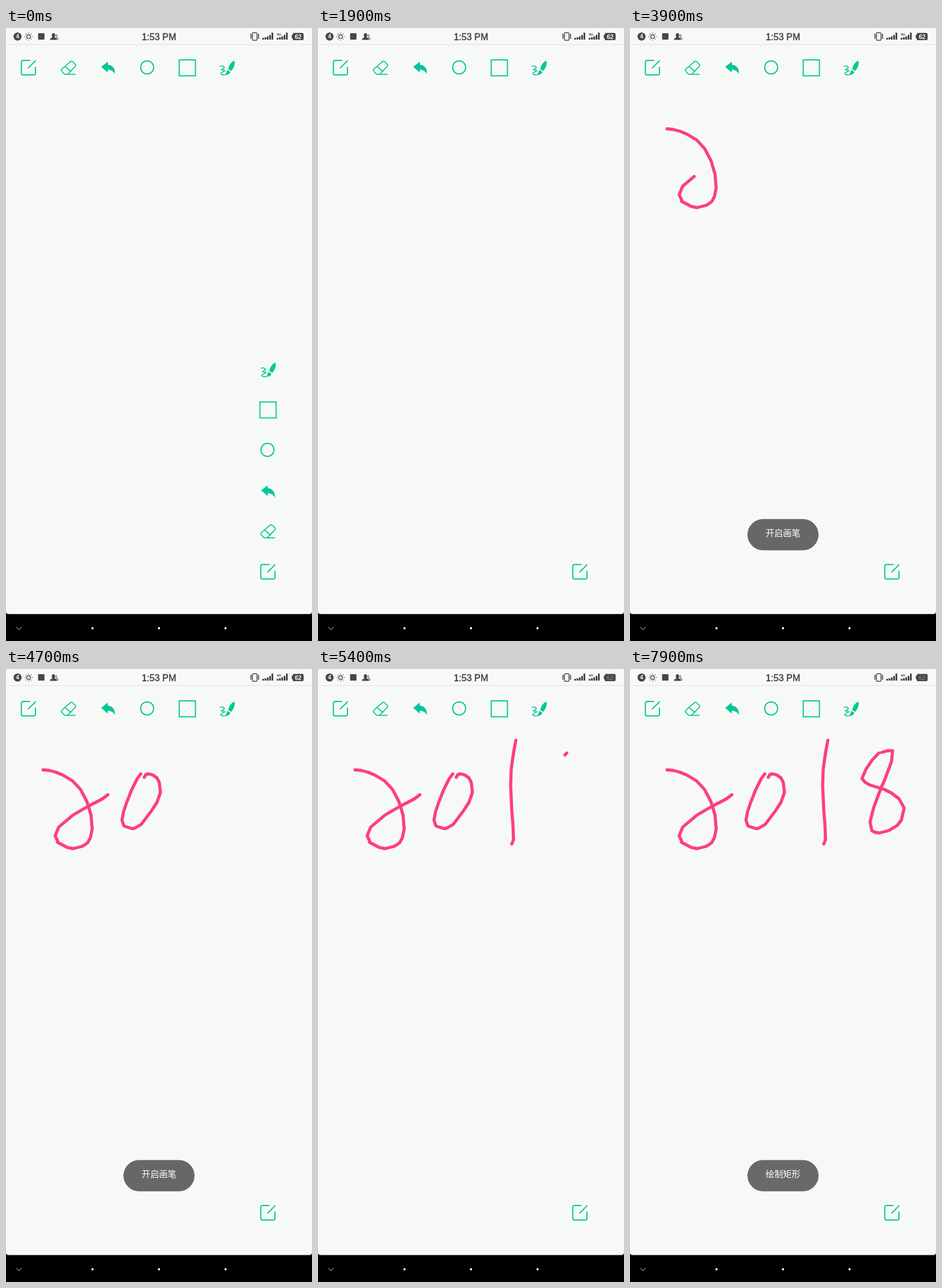
An HTML page for the animation above (8 s loop, 529 px wide and 1058 px high).

```html
<!DOCTYPE html>
<html lang="zh">
<head>
<meta charset="utf-8">
<title>Drawing board</title>
<style>
html, body { margin: 0; width: 100%; height: 100%; overflow: hidden; background: #000; }
svg { display: block; width: 100%; height: 100%; }
:root { --green: #07c798; --dark: #444645; }

.line { fill: none; stroke: var(--green); stroke-width: 2; stroke-linecap: round; stroke-linejoin: round; }
.solid { fill: var(--green); }
.dark { fill: var(--dark); }
.dark-line { fill: none; stroke: var(--dark); stroke-width: 1.4; }
.label { font-family: "Liberation Sans", Arial, sans-serif; text-anchor: middle; }
.clock { font-size: 16px; fill: #404241; stroke: #404241; stroke-width: .45; }
.small { font-weight: bold; fill: #f7f9f7; }

.item, .pen path, .toast, .level { animation: 8s linear infinite; }
.item { animation-name: collapse; }
.level { animation-name: blink; animation-timing-function: step-end; }

.pen { fill: none; stroke: #fd3f7f; stroke-width: 5.4; stroke-linecap: round; stroke-linejoin: round; }
.pen path { stroke-dasharray: 1 2; }
.two { animation-name: two !important; }
.zero { animation-name: zero !important; }
.one { animation-name: one !important; }
.eight { animation-name: eight !important; }

.toast { font: 15px "Noto Sans CJK SC", "Noto Sans CJK", sans-serif; text-anchor: middle; fill: #fff; }
.toast rect { fill: #666866; }
.start { animation-name: start; }
.shape { animation-name: shape; }

@keyframes collapse {
  0%, 10% { transform: none; opacity: 1; animation-timing-function: ease-in-out; }
  22.5%, 23.2% { transform: translateY(var(--drop)); opacity: 1; }
  23.21%, 100% { transform: translateY(var(--drop)); opacity: 0; }
}
@keyframes blink {
  0%, 16.25%, 47.5%, 78.75% { fill: #f7f9f7; }
  3.75%, 35%, 66.25%, 97.5%, 100% { fill: #727473; }
}
@keyframes two {
  0%, 41.9% { stroke-dashoffset: 1; opacity: 0; }
  41.91% { stroke-dashoffset: 1; opacity: 1; }
  50.6%, 100% { stroke-dashoffset: 0; opacity: 1; }
}
@keyframes zero {
  0%, 52.5% { stroke-dashoffset: 1; opacity: 0; }
  52.51% { stroke-dashoffset: 1; opacity: 1; }
  58%, 100% { stroke-dashoffset: 0; opacity: 1; }
}
@keyframes one {
  0%, 60.6% { stroke-dashoffset: 1; opacity: 0; }
  60.61% { stroke-dashoffset: 1; opacity: 1; }
  65%, 100% { stroke-dashoffset: 0; opacity: 1; }
}
@keyframes eight {
  0%, 67.37% { stroke-dashoffset: 1; opacity: 0; }
  67.38% { stroke-dashoffset: 1; opacity: 1; }
  78.75%, 100% { stroke-dashoffset: 0; opacity: 1; }
}
@keyframes start {
  0%, 31.8% { opacity: 0; animation-timing-function: ease-out; }
  36.8%, 59.2% { opacity: 1; }
  63.5%, 100% { opacity: 0; }
}
@keyframes shape {
  0%, 94.3% { opacity: 0; animation-timing-function: ease-out; }
  99.3%, 100% { opacity: 1; }
}
</style>
</head>
<body>
<svg viewBox="0 0 529 1058" preserveAspectRatio="none">
  <defs>
    <g id="edit" class="line">
      <path d="M41 56H29.5Q26.5 56 26.5 59V78Q26.5 81 29.5 81H48Q51 81 51 78V67.5M51 56.5L38.5 69"/>
    </g>
    <g id="eraser" class="line" style="stroke-width:1.7">
      <path d="M111.5 58Q113.3 56.6 115 58L119.8 62.6Q121.3 64.4 119.8 66.2L106.5 79.8H101.5L96.3 74.8Q94.8 73 96.3 71.2ZM102.5 66.8L112 75M101.5 79.8H119.5"/>
    </g>
    <path id="undo" class="solid" d="M164.5 67L176 58V63.2C184.5 64 189 70 188.3 79.5C185 74 181.5 72 176 72V77Z"/>
    <circle id="ring" class="line" cx="244" cy="68" r="11.3"/>
    <rect id="box" class="line" style="stroke-linejoin:miter" x="299.5" y="55" width="28" height="27.5"/>
    <g id="brush">
      <path class="solid" d="M395 56.5C389 58 386 64 384 71L389.5 74C394 69 396.3 63 395 56.5ZM383 72.5L388 75.5C386.5 79.5 383.5 81 379 81C381 79 381 75 383 72.5Z"/>
      <path class="line" style="stroke-width:1.7" d="M370 66Q375 64.5 377.5 67.5Q377 70 372 72.5Q376 72 378.5 74Q372 76.5 371 79Q374 82 380 80.3"/>
    </g>
    <g id="bars" class="dark">
      <path d="M0 17h3v3h-3zM4 16h3v4h-3zM8 14.5h3v5.5h-3zM12 12h3v8h-3zM16 8h3v12h-3z"/>
    </g>
    <rect id="pill" x="203" y="847.5" width="123" height="54" rx="27"/>
  </defs>

  <rect width="529" height="1058"/>
  <path fill="#f7f9f7" d="M0 0H529V1007Q529 1011.5 524 1011.5H5Q0 1011.5 0 1007Z"/>
  <path fill="#dfe1df" d="M0 28h529v1H0z"/>

  <!-- status bar -->
  <circle class="dark" cx="20" cy="14.7" r="7"/>
  <text class="label small" x="20" y="18.2" font-size="10">4</text>
  <circle class="dark-line" cx="39" cy="14.7" r="3.2"/>
  <circle class="dark-line" cx="39" cy="14.7" r="6.3" pathLength="16" stroke-dasharray=".55 1.45" stroke-dashoffset=".27" stroke-width="1.8"/>
  <rect class="dark" x="55.5" y="9" width="11" height="11"/>
  <path fill="#a5a7a6" d="M84 20Q87 16 85 13Q85 10.5 87 10.5Q89.5 10.5 89 14Q88 16 91 17.5V20Z"/>
  <path class="dark" d="M76 20.5Q76 17.5 79.5 16.8Q80.5 16 79.3 14Q78.5 9 82 9Q85.5 9 84.7 14Q83.5 16 84.5 16.8Q88 17.5 88 20.5Z"/>
  <text class="label clock" x="264.5" y="20.5">1:53 PM</text>
  <rect class="dark-line" x="426.2" y="8.2" width="7.6" height="13" rx="1"/>
  <path class="dark-line" stroke-width="1" d="M422.8 10l1.4 1.7-1.4 1.7 1.4 1.7-1.4 1.7 1.4 1.7M437.2 10l-1.4 1.7 1.4 1.7-1.4 1.7 1.4 1.7-1.4 1.7"/>
  <use href="#bars" x="443"/>
  <use href="#bars" x="468"/>
  <text class="label dark" x="472" y="13" font-size="6" font-weight="bold">4G</text>
  <path class="dark" d="M498 8.5H512Q514.5 8.5 514.5 11V18.5Q514.5 21 512 21H498Q495.5 21 495.5 18.5V17.5H494V12H495.5V11Q495.5 8.5 498 8.5Z"/>
  <text class="label small level" x="505" y="18.6" font-size="10.5">62</text>

  <!-- toolbar -->
  <use href="#edit"/>
  <use href="#eraser"/>
  <use href="#undo"/>
  <use href="#ring"/>
  <use href="#box"/>
  <use href="#brush"/>

  <g class="pen">
    <path class="two" pathLength="1" d="M64 174L74 175 86 178 98 183 115 193 129 208 140 229 147 252 149 276 146 291 141 300 132 306 116 310 106 308 89 299 89 296 85 288 91 273 116 252 140 238 167 224 176 217"/>
    <path class="zero" pathLength="1" d="M233 181L227 189 217 209 208 232 203 247 200.500 261 204 271 218 275.500 222 275 234 268 252 244 261 230 267 213 265 196 261 188 254 183 247 181 242 182 239 187"/>
    <path class="one" pathLength="1" d="M342 123L338 145 334 173 333 200 335 245 337 268 338 295 335 302"/>
    <path class="eight" pathLength="1" d="M430 145L418 158 408 173 401 189 406 195 414 200 440 208 452 214 465 224 474 240 469 261 462 270 447 279 431 283 424 282 418 279 415 264 421 240 434 205 440 192 452 160 454 141 445 141 435 144"/>
  </g>

  <!-- floating menu -->
  <use class="item" style="--drop:348px" href="#brush" x="71" y="521"/>
  <use class="item" style="--drop:279px" href="#box" x="139.5" y="590.5"/>
  <use class="item" style="--drop:210px" href="#ring" x="208" y="660"/>
  <use class="item" style="--drop:139px" href="#undo" x="276.5" y="731"/>
  <use class="item" style="--drop:70px" href="#eraser" x="345" y="800"/>
  <use href="#edit" x="414" y="870"/>

  <g class="toast start"><use href="#pill"/><rect x="203" y="847.5" width="123" height="54" rx="27"/><text x="264.5" y="877">开启画笔</text></g>
  <g class="toast shape"><rect x="203" y="847.5" width="123" height="54" rx="27"/><text x="264.5" y="877">绘制矩形</text></g>

  <!-- navigation bar -->
  <path fill="none" stroke="#777" stroke-width="1.3" d="M18 1034l4.500 4.500 4.500-4.500"/>
  <g fill="#fff">
    <circle cx="149.500" cy="1036" r="1.900"/>
    <circle cx="264.500" cy="1036" r="1.900"/>
    <circle cx="379.500" cy="1036" r="1.900"/>
  </g>
</svg>
</body>
</html>
```
